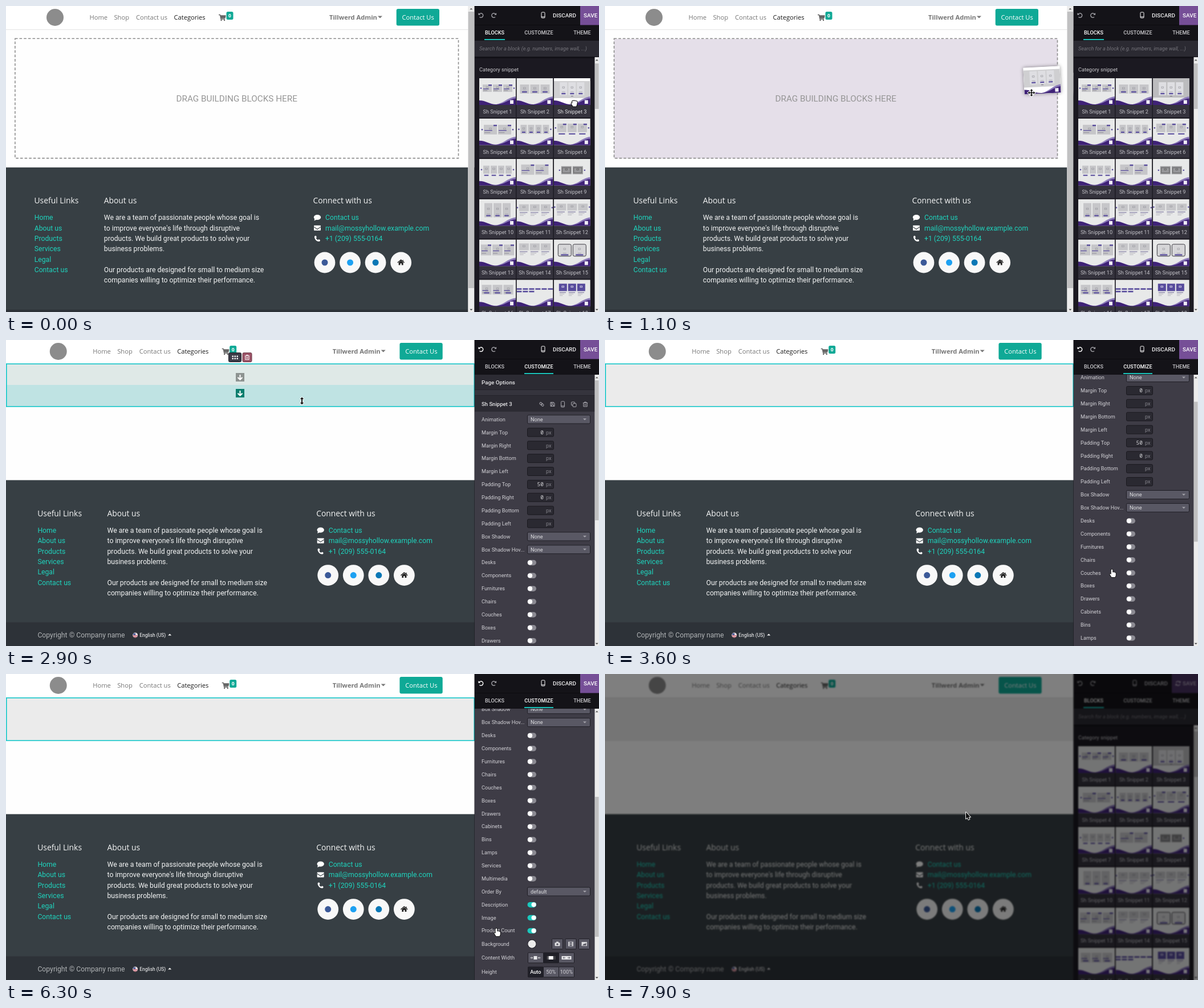
These frames come from a looping animation (1040 px wide and 538 px high, 8 s). An HTML page with a canvas:

```html
<!DOCTYPE html>
<html lang="en">
<head>
<meta charset="utf-8">
<title>Website builder</title>
<style>
html, body { margin: 0; width: 100%; height: 100%; overflow: hidden; background: #fff; }
canvas { display: block; width: 1040px; height: 538px; }
</style>
</head>
<body>
<canvas id="stage" width="1040" height="538"></canvas>
<script>
const canvas = document.getElementById('stage');
const c = canvas.getContext('2d');
const LOOP = 8000, TICK = 100;
const UI = 'Roboto, sans-serif', SANS = '"Open Sans", "Noto Sans", sans-serif', MONO = '"Noto Sans Mono", monospace';
const TEAL = '#0fa996', LINK = '#1fd3bd', VIOLET = '#574b9c', FOOT = '#373f44';

// ---- helpers ----
function rect(x, y, w, h, color) { c.fillStyle = color; c.fillRect(x, y, w, h); }
function round(x, y, w, h, r, color, line) {
  c.beginPath(); c.roundRect(x, y, w, h, r);
  if (color) { c.fillStyle = color; c.fill(); }
  if (line) { c.strokeStyle = line; c.lineWidth = 1; c.stroke(); }
}
function disc(x, y, r, color) { c.beginPath(); c.arc(x, y, r, 0, 7); c.fillStyle = color; c.fill(); }
function shape(d, x, y, fill, line, width = 1) {
  const p = new Path2D(d);
  c.save(); c.translate(x, y);
  c.lineJoin = 'round';
  if (line) { c.strokeStyle = line; c.lineWidth = width; c.stroke(p); }
  if (fill) { c.fillStyle = fill; c.fill(p); }
  c.restore();
}
// y is the middle of the capitals
function text(s, x, y, size, color, { weight = 400, align = 'left', font = UI } = {}) {
  c.font = `${weight} ${size}px ${font}`;
  c.textAlign = align;
  c.fillStyle = color;
  c.fillText(s, x, y + size * .355);
}
const caret = (x, y, w, color, up) => {
  const h = w / 2 * (up ? -1 : 1);
  shape(`M${-w / 2} ${-h / 2}H${w / 2}L0 ${h / 2}Z`, x, y, color);
};
const mix = (a, b, k) => a + (b - a) * k;
const ease = k => { k = Math.min(1, Math.max(0, k)); return k * k * (3 - 2 * k); };

function scrollbar(x, w, top, from, to) {
  rect(x, top, w, 538 - top, '#ececec');
  rect(x + .5, from, w - 1, to - from, '#c0c0c1');
  caret(x + w / 2, top + 5, 5, '#555', true);
  caret(x + w / 2, 534, 5, '#444');
}

// ---- web page ----
function header(dx) {
  rect(0, 0, 822, 41, '#fff');
  rect(0, 41, 822, 1, '#e4e4e4');
  disc(86 + dx, 20, 15, '#8c8c8c');
  const nav = (s, x, color, weight) => text(s, x + dx, 20.3, 11.15, color, { font: SANS, weight });
  nav('Home', 146.5, '#777');
  nav('Shop', 189.5, '#777');
  nav('Contact us', 228, '#777');
  nav('Categories', 294.5, '#1c1c1c');
  shape('M0 0H2.5L4 7.5H11M2.8 1.5H12L11 5.5H3.6', 373 + dx, 15.5, null, '#666', 1.4);
  shape('M2.8 1.5H12L11 5.5H3.6Z', 373 + dx, 15.5, '#666');
  disc(377.5 + dx, 25, 1.2, '#666'); disc(383 + dx, 25, 1.2, '#666');
  round(386.5 + dx, 10, 12, 14, 2.5, TEAL);
  text('0', 392.5 + dx, 17, 8.5, '#fff', { weight: 700, align: 'center', font: SANS });
  nav('Tillwerd Admin', 567, '#777', 700);
  caret(656 + dx, 19.5, 8, '#777');
  round(684.7 + dx, 5, 75.3, 29.5, 3, TEAL);
  nav('Contact Us', 694.5, '#fff');
}

function footer(dx, top) {
  rect(0, top, 822, 538 - top, FOOT);
  const line = 18.34;
  const head = (s, x) => text(s, x + dx, top + 58.5, 13.85, '#f4f5f5', { font: SANS });
  const lines = (list, x, color) => list.forEach((s, i) => text(s, x + dx, top + 88.2 + i * line, 12.23, color));
  head('Useful Links', 49.5); head('About us', 171.7); head('Connect with us', 538.5);
  lines(['Home', 'About us', 'Products', 'Services', 'Legal', 'Contact us'], 49.7, LINK);
  lines(['We are a team of passionate people whose goal is', 'to improve everyone\'s life through disruptive',
    'products. We build great products to solve your', 'business problems.', '',
    'Our products are designed for small to medium size', 'companies willing to optimize their performance.'], 171.8, '#f4f5f5');
  lines(['Contact us', 'mail@mossyhollow.example.com', '+1 (209) 555-0164'], 560, LINK);

  const ix = 546 + dx, iy = top + 88.2;
  c.beginPath(); c.ellipse(ix, iy - .5, 6.2, 4.6, 0, 0, 7); c.fillStyle = '#fff'; c.fill();
  shape('M-4.5 1L-5.5 5.5L0 3Z', ix, iy, '#fff');
  round(ix - 6, iy + line - 4.5, 12, 9, 1, '#fff');
  shape('M-6 -2L0 2.2L6 -2', ix, iy + line, null, FOOT, 1.1);
  shape('M-5 -4L-2.5 -5L-1 -2L-2.4 -.6Q-1 2 1.2 2.8L2.5 1.2L5 2.8L4.3 5Q-.5 6.5 -4 1Q-5.5 -2 -5 -4Z', ix, iy + 2 * line, '#fff');

  const sy = top + 167.2;
  [['#3b5998'], ['#1da1f2'], ['#0a77b5'], []].forEach(([mark], i) => {
    const x = 559 + dx + i * 44.55;
    disc(x, sy, 18.4, '#f8f8f8');
    if (mark) disc(x, sy, 5.5, mark);
    else {
      shape('M-4 0L0 -3.4L4 0V4.5H1.2V1.5H-1.2V4.5H-4Z', x, sy, '#222');
      shape('M-6 .3L0 -4.8L6 .3M3.6 -4.5V-2', x, sy, null, '#222', 1.3);
    }
  });

  const by = top + 250;
  rect(0, by, 822, 60, '#2d3238');
  text('Copyright © Company name', 49.7 + dx, by + 22.2, 12.23, '#b0b3b5');
  const fx = 221 + dx;
  disc(fx, by + 22.5, 4.5, '#e9dfe3');
  rect(fx - 4, by + 23, 8, 1.3, '#c4485a'); rect(fx - 2.5, by + 25.5, 5, 1, '#c4485a');
  rect(fx - 3.5, by + 19.3, 4, 3, '#40508f');
  text('English (US)', 228.5 + dx, by + 22.3, 8.5, '#fff');
  caret(281.5 + dx, by + 21.5, 6, '#fff', true);
}

function emptyPage(hot) {
  rect(0, 42, 811, 243, '#fefefe');
  if (hot) rect(16, 58, 778, 210, '#e5dfe9');
  c.strokeStyle = '#8e8e8e'; c.lineWidth = 1.6;
  c.setLineDash([4.6, 3.05]); c.strokeRect(15.9, 57.3, 777.6, 210.3); c.setLineDash([]);
  text('DRAG BUILDING BLOCKS HERE', 404.7, 162.3, 15.28, '#959595', { align: 'center' });
  footer(0, 283.8);
  header(0);
  scrollbar(810.2, 11.3, 0, 10, 496);
}

function sectionPage(framed, overlay) {
  rect(0, 42, 822, 206, '#fefefe');
  rect(0, 42, 822, 75.7, '#ebebeb');
  footer(5.7, 246.4);
  header(5.7);
  if (overlay) {
    rect(0, 42, 822, 37, '#dfe9e7');
    rect(0, 79, 822, 38, '#bfe3e3');
    [[58, '#8d9391'], [86, '#087d6d']].forEach(([y, color]) => {
      rect(403, y, 15, 15, color);
      shape('M0 -4.5V4M-4 .3L0 4.3L4 .3', 410.5, y + 7.5, null, '#fff', 2);
    });
    round(390.5, 22.5, 22, 16, 2, '#3c3b47', '#202028');
    for (let i = 0; i < 6; i++) rect(396.5 + i % 3 * 4, 27.5 + (i > 2) * 4, 2.4, 2.4, '#fff');
    round(415, 22.5, 16, 16, 2, '#9c5367', '#6a3846');
    trash(423, 30.5, '#fff');
  }
  if (framed) { c.strokeStyle = '#16c8cb'; c.lineWidth = 1.6; c.strokeRect(.8, 42, 820.4, 75); }
}

// ---- small icons ----
function trash(x, y, color) {
  shape('M-3.2 -2V4H3.2V-2M-4.2 -2.5H4.2M-1.5 -2.5V-4H1.5V-2.5M-1 -.5V2.5M1 -.5V2.5', x, y, null, color, 1);
}
function mobile(x, y, color) {
  round(x - 3, y - 5, 6, 10, 1.2, null, color);
  rect(x - 3, y + 2.5, 6, 1, color);
}
function turn(x, y, flip, color) {
  c.save(); c.translate(x, y); c.scale(flip, 1);
  c.beginPath(); c.arc(0, 0, 3.7, -2.5, 2.3); c.strokeStyle = color; c.lineWidth = 1.4; c.stroke();
  shape('M-4.6 -4.6V-.8H-.9Z', 0, 0, color);
  c.restore();
}

// ---- side panel ----
// cards, card width, top, height, details: t tag, b button, u bars below, l lines below,
// a arrows, s strip, d dark, p violet, o outline, w band, r rows of buttons
const THUMBS = [
  [3, 16, 11, 13, 'tsa'], [3, 16, 11, 16, 'b'], [3, 13, 7, 23, 'wb'],
  [2, 23, 11, 17, 'tsa'], [4, 11, 11, 16, 'ba'], [3, 16, 9, 15, 'tua'],
  [4, 11, 12, 14, 'ua'], [2, 23, 10, 18, 'ts'], [2, 18, 13, 14, 'da'],
  [3, 14, 7, 25, 'b'], [3, 17, 9, 12, 'la'], [3, 17, 8, 12, 'la'],
  [3, 18, 9, 19, 'ts'], [3, 17, 7, 12, 'l'], [2, 24, 8, 22, 'ob'],
  [3, 17, 9, 17, 'sb'], [6, 9, 15, 3, 'r'], [3, 14, 7, 13, 'pl']
];

function thumb(i, x, y, lit) {
  const [n, w, top, h, kind] = THUMBS[i], has = k => kind.includes(k);
  c.save();
  c.beginPath(); c.rect(x, y, 64, 47); c.clip();
  c.translate(x, y);
  rect(0, 0, 64, 47, lit ? '#fff' : '#e8e9e9');
  if (has('w')) rect(0, lit ? 5 : 0, 64, lit ? 30 : 34, lit ? '#cfcfd1' : '#bcbcbe');
  shape('M24 47C44 45 48 34 64 32V47Z', 0, 0, '#8a79b8');
  shape('M0 39C12 39 18 46 30 46C46 45 50 37 64 35.5V47H0Z', 0, 0, '#3f2277');
  rect(54, 38.5, 6, 6.5, '#f0edf6');
  const left = 32 - (n * (w + 2) - 2) / 2;
  for (let k = 0; k < n; k++) {
    const cx = left + k * (w + 2), mid = cx + w / 2;
    if (has('r')) {
      rect(cx, top, w, 2.6, VIOLET);
      if (k < 3) rect(cx, top + 4.5, w, 2.6, VIOLET);
      continue;
    }
    if (has('o')) round(cx + .5, top + .5, w - 1, h - 1, 2.5, '#d6d6d8', '#3a3940');
    else rect(cx, top, w, h, has('p') ? VIOLET : has('d') ? '#97979a' : has('w') ? '#dedee2' : '#c6c6c9');
    c.strokeStyle = has('p') ? '#fff' : has('d') ? '#555' : '#98989e'; c.lineWidth = .7;
    c.strokeRect(mid - 1.8, top + h * .4 - 1.3, 3.6, 2.6);
    if (has('d')) c.strokeRect(cx + 2, top + 2.5, w - 4, h - 5);
    if (has('t')) rect(cx + w - 6, top, 6, 2.4, VIOLET);
    if (has('s')) { rect(cx + 1, top + h * .55, w * .6, 1.3, VIOLET); rect(cx + 1, top + h * .78, w * .45, 1, '#8f8d9a'); }
    if (has('b')) { rect(mid - w * .27, top + h - 4, w * .54, 2.2, VIOLET); rect(mid - 3, top + h - 6.3, 6, 1, '#a5a3ae'); }
    if (has('u')) rect(mid - w * .35, top + h + 2, w * .7, 2, VIOLET);
    if (has('l')) for (let q = 0; q < 3; q++) rect(cx + 1, top + h + 2 + q * 2.6, w * (.8 - q * .2), 1.1, q ? '#b8b7bf' : '#77719b');
  }
  if (has('a')) { disc(left - 3, top + h / 2, 1.3, VIOLET); disc(67 - left, top + h / 2, 1.3, VIOLET); }
  if (has('w')) rect(30, 31, 4, 1, '#77757f');
  c.restore();
}

function blocksPanel(hover) {
  rect(822, 61, 218, 477, '#1b1921');
  rect(822, 61, 218, 28, '#2b2a32');
  rect(822, 89, 211, 3, '#121117');
  text('Search for a block (e.g. numbers, image wall, ...)', 830, 75, 9.17, '#74737a', { weight: 'italic 400' });
  text('Category snippet', 830, 112.2, 9.17, '#c9c8cc');
  THUMBS.forEach((_, i) => {
    const x = 830 + i % 3 * 65.4, y = 127 + Math.floor(i / 3) * 70.85, lit = hover && i == 2;
    rect(x, y + 47, 64, 22, '#35333d');
    thumb(i, x, y, lit);
    text('Sh Snippet ' + (i + 1), x + 32, y + 58.4, 9.17, lit ? '#e4e4e6' : '#c3c2c8', { align: 'center' });
  });
  scrollbar(1032.5, 7.5, 90, 101, 181);
}

const TOGGLES = ['Desks', 'Components', 'Furnitures', 'Chairs', 'Couches', 'Boxes', 'Drawers', 'Cabinets', 'Bins',
  'Lamps', 'Services', 'Multimedia'];
const SPACES = [['Margin Top', '0'], ['Margin Right'], ['Margin Bottom'], ['Margin Left'], ['Padding Top', '50'],
  ['Padding Right', '0'], ['Padding Bottom'], ['Padding Left']];

function customPanel(scroll, on) {
  c.save();
  c.beginPath(); c.rect(822, 61, 211, 477); c.clip();
  rect(822, 61, 211, 477, '#3e3c46');
  c.translate(0, -scroll);
  rect(822, 61, 211, 26, '#2c2b33');
  rect(822, 87, 211, 11, '#35343d');
  rect(822, 87, 211, 1, '#24232a'); rect(822, 97, 211, 1, '#24232a');
  rect(822, 98, 211, 28, '#2c2b33');
  text('Page Options', 834, 74.5, 9.8, '#e6e6e8', { weight: 500 });
  text('Sh Snippet 3', 834, 113, 9.5, '#e6e6e8', { weight: 500 });
  const dim = '#a8a7ae';
  c.save(); c.translate(939.5, 113); c.rotate(.7);
  round(-4, -1.8, 4.5, 3.6, 1.6, null, dim); round(-.5, -1.8, 4.5, 3.6, 1.6, null, dim);
  c.restore();
  shape('M-3.5 -3.5H2L3.5 -2V3.5H-3.5ZM-2 -3.5V-1H1V-3.5M-2 3.5V1H2V3.5', 958.5, 113, null, dim);
  mobile(976.5, 113, dim);
  round(991.5, 109, 6, 6, 1, null, dim); round(994, 111.5, 6, 6, 1, '#2c2b33', dim);
  trash(1016, 113, dim);

  let y = 139.5;
  const step = 22.88;
  const label = s => text(s, 834, y, 9.17, '#d2d1d6');
  const select = (s, v) => {
    label(s);
    round(914.5, y - 7.5, 110, 15, 2, '#595864', '#1f1e25');
    text(v, 920, y, 9.17, '#dddde0'); caret(1015, y, 6, '#a5a4ab');
    y += step;
  };
  const toggle = (s, active) => {
    label(s);
    round(914.5, y - 4.5, 15.5, 9.5, 4.75, active ? '#19c8bd' : '#8c8b93');
    disc(active ? 925.6 : 919, y + .2, 4.1, '#fff');
    y += step;
  };
  const button = (x, w, active) => round(x + .5, y - 9, w - 1, 18, 1, active ? '#202028' : '#595864', '#1f1e25');

  select('Animation', 'None');
  for (const [s, v = ''] of SPACES) {
    label(s);
    round(914.5, y - 7.5, 46, 15, 2, '#2a2931', '#1a191f');
    text(v, 943, y, 9.5, '#d8d8db', { align: 'right', font: MONO });
    text('px', 947, y, 9.17, '#85848c');
    y += step;
  }
  select('Box Shadow', 'None');
  select('Box Shadow Hov...', 'None');
  TOGGLES.forEach(s => toggle(s, false));
  select('Order By', 'default');
  ['Description', 'Image', 'Product Count'].forEach((s, i) => toggle(s, on[i]));

  y += .6;
  label('Background');
  disc(922.4, y, 7.8, '#202028'); disc(922.4, y, 7, '#ececec');
  [957, 980.5, 1004].forEach(x => button(x, 20));
  round(962.5, y - 2.5, 9, 6, 1, '#e0e0e2'); rect(965, y - 4, 4, 2, '#e0e0e2'); disc(967, y + .5, 1.7, '#595864');
  rect(986, y - 4, 9, 8, '#c8c8cc'); rect(988.5, y - 3, 4, 2.5, '#595864'); rect(988.5, y + .7, 4, 2.5, '#595864');
  rect(1009.5, y - 3.5, 9.5, 7, '#e0e0e2'); shape('M-3.5 2.5L0 -1L1 0L3.5 -2.5V2.5Z', 1014.2, y, '#595864');
  y += 24.3;
  label('Content Width');
  [915, 942, 969].forEach((x, i) => button(x, 28, i == 1));
  rect(925.5, y - 3, 6, 6, '#e8e8ea');
  shape('M-9 0H-5M-6.5 -1.5L-5 0L-6.5 1.5M9 0H5M6.5 -1.5L5 0L6.5 1.5', 928.5, y, null, '#e8e8ea');
  rect(951.5, y - 3, 8.5, 6, '#fff'); rect(949, y - 3, 1, 6, '#777'); rect(962, y - 3, 1, 6, '#777');
  rect(974.5, y - 3, 17, 6, '#e8e8ea');
  shape('M-6 0H-2M-4.5 -1.5L-6 0L-4.5 1.5M6 0H2M4.5 -1.5L6 0L4.5 1.5', 983, y, null, '#595864');
  y += 25;
  label('Height');
  ['Auto', '50%', '100%'].forEach((s, i) => {
    button(915 + i * 27, 28, !i);
    text(s, 928.8 + i * 27, y, 9.17, i ? '#d2d1d6' : '#fff', { align: 'center', weight: i ? 400 : 500 });
  });
  c.restore();
  const thumbTop = 71 + scroll * .512;
  scrollbar(1032.5, 7.5, 61, thumbTop, thumbTop + 246);
}

function panelTop(tab, undo, saving) {
  rect(822, 0, 218, 61, '#141318');
  rect(822, 33, 218, 1, '#0c0b0f');
  turn(833, 16.5, 1, undo ? '#fff' : '#a09fa5');
  turn(855.5, 16.5, -1, '#a09fa5');
  const shift = saving ? -13 : 0;
  mobile(942 + shift, 16, saving ? '#b5b4b9' : '#fff');
  text('DISCARD', 959 + shift, 16.5, 9.93, saving ? '#b5b4b9' : '#f0f0f1', { weight: 500 });
  rect(1007 + shift, 0, 33 - shift, 33.5, saving ? '#47305f' : '#764f97');
  text('SAVE', 1013, 16.5, 9.93, saving ? '#b3a8bd' : '#fff', { weight: 500 });
  if (saving) {
    c.strokeStyle = '#b3a8bd'; c.lineWidth = 1.4;
    [0, Math.PI].forEach(a => {
      c.beginPath(); c.arc(1005, 16.5, 3.7, a + .3, a + 2.7); c.stroke();
      const s = a ? 1 : -1;
      shape(`M${s * 4.6} ${-s * 4.5}V${-s}H${s}Z`, 1005, 16.5, '#b3a8bd');
    });
  }
  [['BLOCKS', 857], ['CUSTOMIZE', 934.5], ['THEME', 1010.5]].forEach(([s, x], i) => {
    text(s, x, 47.2, 9.17, i == tab ? '#fff' : '#c9c8cc', { weight: 500, align: 'center' });
    if (i == tab) { const w = i ? 51 : 36; rect(x - w / 2, 58, w, 2, '#1cc3ba'); }
  });
}

// ---- pointer ----
const PATH = [
  [0, 997, 171, 'grab'], [700, 997, 171, 'move'], [800, 972, 171, 'move'], [900, 921, 170, 'move'],
  [1300, 575, 135, 'move'], [1400, 537, 121, 'hand'], [1500, 537, 121, 'hand'], [1600, 537, 135, 'hand'],
  [1700, 537, 135, 'hand'], [1800, 532, 124, 'arrow'], [2000, 519, 99, 'arrow'], [2300, 519, 99, 'arrow'],
  [2400, 520, 99, 'hand'], [2700, 519, 107, 'size'], [2900, 519, 107, 'size'], [3000, 600, 175, 'arrow'],
  [3200, 889, 403, 'hand'], [4200, 889, 403, 'hand'], [4400, 861, 407, 'hand'], [4600, 861, 407, 'hand'],
  [4800, 851, 414, 'hand'], [4900, 847, 420, 'hand'], [5100, 847, 421, 'hand'], [5400, 856, 462, 'hand'],
  [5500, 856, 462, 'hand'], [5800, 894, 448, 'hand'], [6000, 872, 424, 'hand'], [6100, 872, 424, 'hand'],
  [6200, 860, 447, 'hand'], [6400, 860, 447, 'hand'], [6500, 868, 447, 'hand'], [6600, 868, 447, 'hand'],
  [7100, 1026, 28, 'arrow'], [7400, 1028, 25, 'arrow'], [7500, 1028, 25, 'arrow'], [7800, 510, 248, 'arrow'],
  [7900, 633, 243, 'arrow']
];
function pointerAt(t) {
  const i = PATH.findLastIndex(k => k[0] <= t), a = PATH[i], b = PATH[i + 1] || a;
  const k = b === a ? 0 : (t - a[0]) / (b[0] - a[0]);
  return { x: mix(a[1], b[1], k), y: mix(a[2], b[2], k), kind: a[3] };
}
function drawPointer({ x, y, kind }) {
  if (kind == 'arrow') shape('M0 0V11.5L2.6 9.2L4.4 13.2L6.4 12.3L4.6 8.5H8Z', x, y, '#111', '#fff', 1.8);
  if (kind == 'hand') shape('M-1.3 9V1.2Q0 -.6 1.3 1.2V5.5Q4 4.8 6.8 6.8V11L5.5 14H-.5L-3.6 9Q-3.2 7 -1.3 9Z', x, y, '#fff', '#111', 1.8);
  if (kind == 'grab') {
    shape('M-4 -3Q-2.5 -5.5 -1 -3.6Q.5 -5.5 2 -3.4Q4.5 -4.4 4.8 -1.5L4 3L3 5.5H-2.5L-5.5 1Q-5.5 -1 -3.5 -.5Z', x, y, '#fff', '#111', 2.2);
  }
  if (kind == 'move') {
    const d = 'M0 -6.5L2.5 -3.5H.8V-.8H3.5V-2.5L6.5 0L3.5 2.5V.8H.8V3.5H2.5L0 6.5L-2.5 3.5H-.8V.8H-3.5V2.5L-6.5 0L-3.5 -2.5V-.8H-.8V-3.5H-2.5Z';
    shape(d, x, y, '#111', '#fff', 2);
  }
  if (kind == 'size') shape('M0 -6.5L3.2 -3H1V3H3.2L0 6.5L-3.2 3H-1V-3H-3.2Z', x, y, '#111', '#fff', 1.6);
}

// ---- timeline ----
function draw(t) {
  const p = pointerAt(t);
  const dragging = t >= 700 && t < 1300, dropped = t >= 1300;
  const framed = t >= 2600 && t < 7300, saving = t >= 7200;
  const custom = t >= 2700 && t < 7300;

  if (dropped) sectionPage(framed, t >= 2600 && t < 3100);
  else emptyPage(dragging);

  rect(821.5, 0, 219, 538, '#141318');
  if (custom) customPanel(283.2 * ease((t - 3300) / 900), [t >= 4600, t >= 5100, t >= 6300]);
  else blocksPanel(t < 700);
  panelTop(custom ? 1 : 0, t >= 1800 && !saving, saving);

  if (dragging) {
    c.save();
    c.translate(p.x + 18.5, p.y - 22);
    c.rotate(-.05);
    c.shadowColor = 'rgba(0,0,0,.45)'; c.shadowBlur = 6;
    rect(-32, -23.5, 64, 47, '#fff');
    c.shadowColor = 'transparent';
    thumb(2, -32, -23.5, true);
    c.restore();
  }
  if (t >= 7500) {
    c.filter = 'blur(1px)';
    c.drawImage(canvas, 0, 0);
    c.filter = 'none';
    rect(0, 0, 1040, 538, 'rgba(0,0,0,.5)');
  }
  drawPointer(p);
}

const start = performance.now();
let last = -1;
function frame() {
  const t = Math.floor((performance.now() - start) % LOOP / TICK) * TICK;
  if (t !== last) draw(last = t);
  requestAnimationFrame(frame);
}
frame();
</script>
</body>
</html>
```
